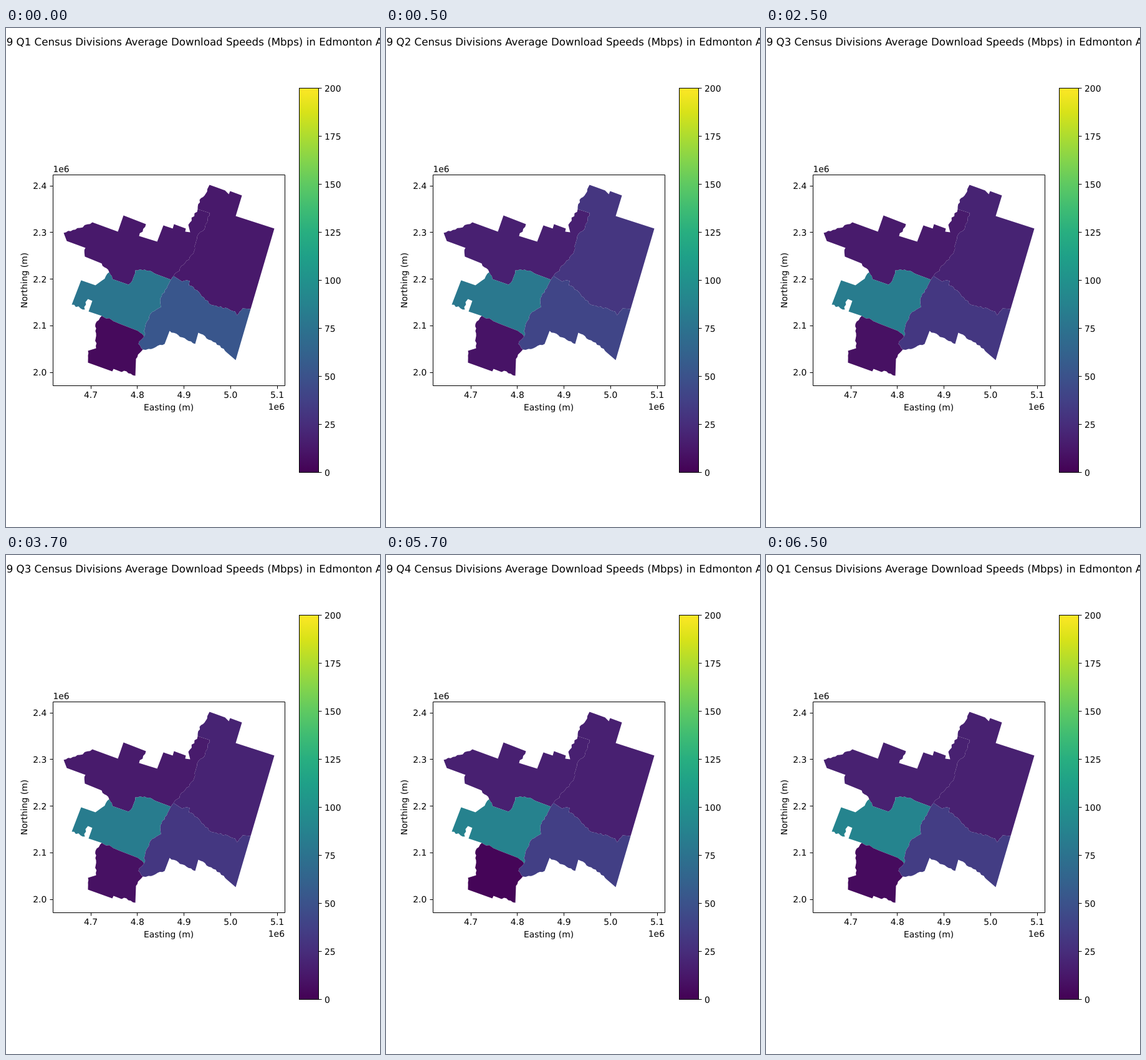
An HTML page that plays this animation: 600 by 800 pixels, repeating every 8 s.

```html
<!DOCTYPE html>
<html lang="en">
<head>
<meta charset="utf-8">
<title>Average download speeds</title>
<style>
  html, body { margin: 0; width: 100%; height: 100%; overflow: hidden; background: #fff; }
  svg { display: block; width: 600px; height: 800px; }
  text { font: 13.889px "DejaVu Sans", sans-serif; fill: #000; text-rendering: geometricPrecision; }
  #title { font-size: 16.667px; }
  .line { fill: none; stroke: #000; stroke-width: 1; }
</style>
</head>
<body>
<svg id="stage" viewBox="0 0 600 800" xmlns="http://www.w3.org/2000/svg">
  <defs><linearGradient id="scale" x1="0" y1="1" x2="0" y2="0"></linearGradient></defs>
</svg>
<script>
const stage = document.getElementById('stage');

function add(tag, attrs, content = '', parent = stage) {
  const el = document.createElementNS('http://www.w3.org/2000/svg', tag);
  for (const key in attrs) el.setAttribute(key, attrs[key]);
  el.textContent = content;
  parent.append(el);
  return el;
}
const label = (x, y, s, anchor = 'start', more = {}) =>
  add('text', { x, y, 'text-anchor': anchor, ...more }, s);
const line = d => add('path', { d, class: 'line' });

// Viridis colour map, evenly spaced
const viridis = ('440154 48186a 472d7b 424086 3b528b 33638d 2c728e 26828e 21918c ' +
  '1fa088 28ae80 3fbc73 5ec962 84d44b addc30 d8e219 fde725')
  .split(' ').map(hex => hex.match(/../g).map(h => parseInt(h, 16)));

function colour(speed) {
  const p = speed / 200 * (viridis.length - 1);
  const i = Math.min(Math.floor(p), viridis.length - 2);
  return `rgb(${viridis[i].map((c, k) => Math.round(c + (viridis[i + 1][k] - c) * (p - i)))})`;
}

let seed = 7;
const random = () => (seed = seed * 16807 % 2147483647) / 2147483647;

// Expands key points into an outline; "~" makes the edge leading to a point ragged.
function outline(keys) {
  const points = [];
  for (const key of keys.split(' ')) {
    const [x, y] = key.replace('~', '').split(',').map(Number);
    if (key[0] === '~') {
      const [px, py] = points.at(-1);
      const dx = x - px, dy = y - py, length = Math.hypot(dx, dy);
      const n = Math.round(length / 4);
      for (let i = 1; i < n; i++) {
        const off = (random() - 0.5) * 3 / length;
        points.push([px + dx * i / n - dy * off, py + dy * i / n + dx * off]);
      }
    }
    points.push([x, y]);
  }
  return points;
}

// Neighbouring regions share their borders.
const northBorder = outline('307,290 326,296 ~318,322 ~308,330 ~300,361 ~287,376 ~264,403');
const centreNorth = outline('264,403 240,394 ~222,387 ~207,388 ~202,405 ~196,411 170,402 ~165,391');
const centreSouth = outline('153,461 ~180,473 211,485 ~221,494');
const centreEast = outline('221,494 ~224,473 ~231,458 ~248,447 ~247,433 ~264,403');
const southBorder = outline('221,494 ~212,506 ~219,515');
const eastBorder = outline('392,450 379,449 ~370,460 367,454 ~325,441 ~306,420 ~293,412 294,405 ~282,406 268,397 264,403');
const northWestCoast = outline('165,391 ~153,377 126,366 ~127,352 97,341 92,328 ~118,320 ~138,311 179,326 188,300 224,314 ~213,333 242,342 252,316 267,321 269,314 288,321 287,326 295,327 292,315 ~307,290');
const northEastCoast = outline('392,450 430,321 368,301 378,268 359,261 357,266 351,260 326,251 ~320,265 ~310,275 ~307,290');
const centreCoast = outline('165,391 ~154,404 143,412 120,404 105,443 ~126,451 ~127,439 131,434 138,437 132,454 153,461');
const southEastCoast = outline('219,515 ~228,514 ~254,506 262,485 ~303,506 308,488 ~336,504 ~354,520 368,532 392,450');
const southWestCoast = outline('219,515 ~208,530 207,557 ~189,549 185,551 172,546 170,550 131,536 ~131,517 144,513 ~144,489 ~143,474 ~153,461');

const back = points => points.slice().reverse();
const regions = [
  [northWestCoast, northBorder, centreNorth],
  [northEastCoast, northBorder, back(eastBorder)],
  [centreCoast, centreSouth, centreEast, centreNorth],
  [southBorder, southEastCoast, eastBorder, back(centreEast)],
  [centreSouth, southBorder, southWestCoast]
].map(arcs => add('polygon', { points: arcs.flat().join(' '), transform: 'translate(0.5 0.4)' }));

// Map axes
line('M75.5 235.5H447.5V573.5H75.5Z');
for (let i = 0; i < 5; i++) {
  const x = 136 + i * 74.75, y = 552 - i * 74.75;
  line(`M${Math.floor(x) + 0.5} 573.5v5M75.5 ${Math.floor(y) + 0.5}h-5`);
  label(x, 593, (4.7 + i / 10).toFixed(1), 'middle');
  label(65.3, Math.floor(y + 5.5), (2 + i / 10).toFixed(1), 'end');
}
label(75.5, 231, '1e6');
label(447, 612, '1e6', 'end');
label(261, 613, 'Easting (m)', 'middle');
label(0, 0, 'Northing (m)', 'middle', { transform: 'translate(34 404.5) rotate(-90)' });

// Colour bar
const gradient = document.getElementById('scale');
for (let v = 0; v <= 200; v += 12.5)
  add('stop', { offset: v / 200, 'stop-color': colour(v) }, '', gradient);
add('rect', { x: 470.5, y: 96.5, width: 31, height: 616, fill: 'url(#scale)', stroke: '#000' });
for (let v = 0; v <= 200; v += 25) {
  const y = 712.5 - v * 3.08;
  line(`M501.5 ${y}h5`);
  label(511, y + 5.5, v);
}

const title = label(300, 28, '', 'middle', { id: 'title' });

// Speeds in Mbps: north-west, north-east, centre, south-east, south-west
const steps = [
  { at: 0, quarter: '2019 Q1', speeds: [13.3, 13.3, 77.6, 53.3, 4.7] },
  { at: 500, quarter: '2019 Q2', speeds: [17.3, 30.6, 80, 40.8, 10] },
  { at: 2500, quarter: '2019 Q3', speeds: [14.1, 18.8, 83.1, 31.4, 8.6] },
  { at: 4500, quarter: '2019 Q4', speeds: [17.3, 17.3, 87.2, 36.9, 2.4] },
  { at: 6500, quarter: '2020 Q1', speeds: [18, 18, 89.4, 35.3, 5.5] }
];

let shown;
function draw(time) {
  const step = steps.findLast(s => s.at <= time % 8000);
  if (step === shown) return;
  shown = step;
  title.textContent = `${step.quarter} Census Divisions Average Download Speeds (Mbps) in Edmonton Area`;
  regions.forEach((region, i) => region.setAttribute('fill', colour(step.speeds[i])));
}

const start = performance.now();
function tick() {
  draw(performance.now() - start);
  requestAnimationFrame(tick);
}
tick();
</script>
</body>
</html>
```
